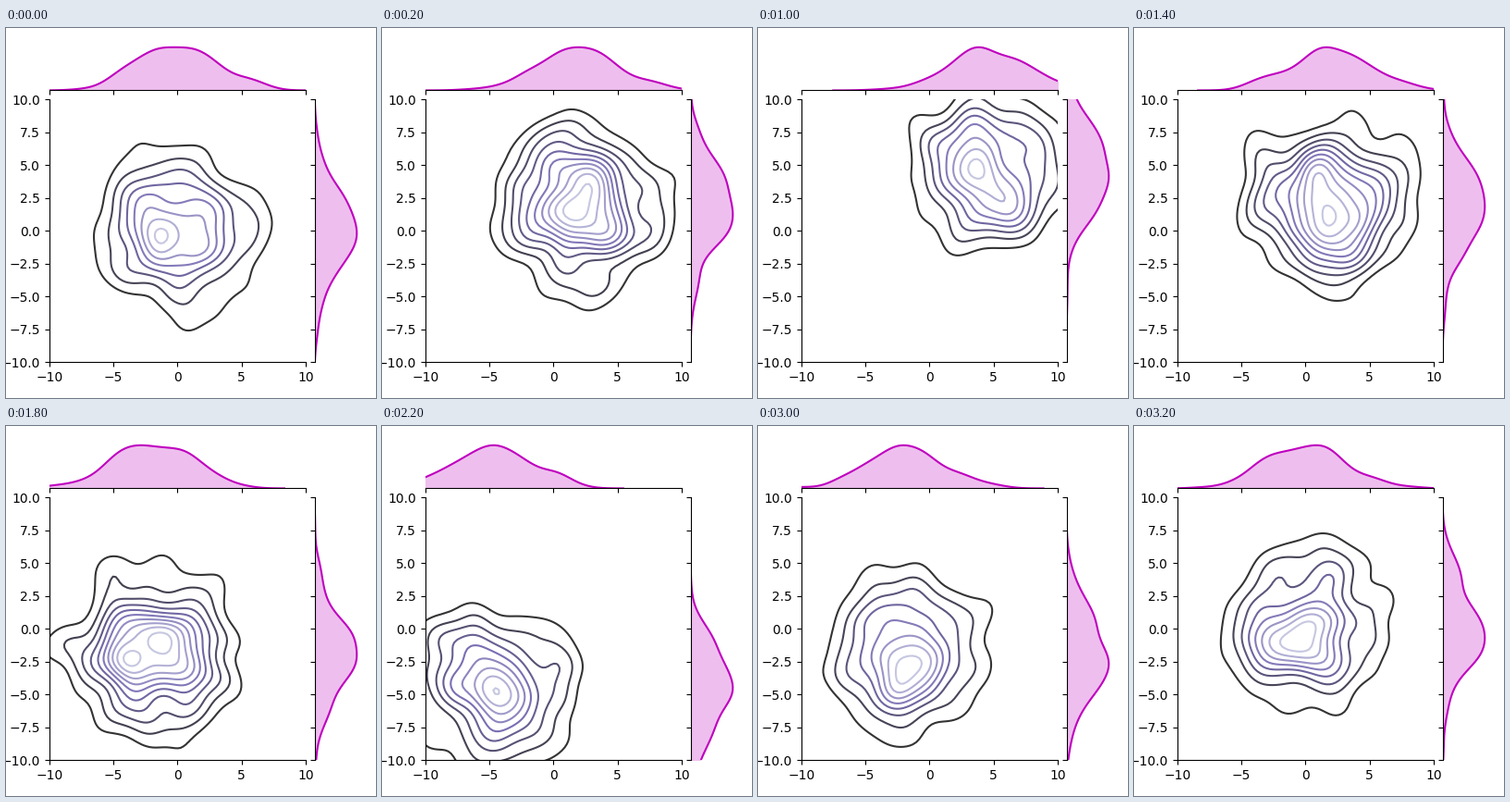
Animation of 400x400 px, one loop 3400 ms. Source, as a matplotlib script:

```python
import numpy as np
import matplotlib.pyplot as plt
from matplotlib.animation import FuncAnimation
from matplotlib.colors import LinearSegmentedColormap
from matplotlib.ticker import MaxNLocator

STEPS, INTERVAL = 17, 200
SWING, SPREAD, COUNT = 5, 3, 260
LINE = 1.5
MAGENTA = (0.75, 0, 0.75)
purples = plt.get_cmap("Purples_r")
CMAP = LinearSegmentedColormap.from_list("dusk", ["#333333", purples(1 / 3), purples(2 / 3)])

fig = plt.figure(figsize=(4, 4), dpi=100)
grid = fig.add_gridspec(6, 6, left=0.1168, right=0.9538, bottom=0.0968, top=0.9538,
                        wspace=0.2, hspace=0.2)
joint = fig.add_subplot(grid[1:, :-1])
top = fig.add_subplot(grid[0, :-1], sharex=joint)
side = fig.add_subplot(grid[1:, -1], sharey=joint)

joint.set_xticks(np.arange(-10, 11, 5))
joint.set_yticks(np.arange(-10, 11, 2.5))
joint.spines[["right", "top"]].set_visible(False)
top.spines[["left", "right", "top"]].set_visible(False)
side.spines[["bottom", "right", "top"]].set_visible(False)
top.set_yticks([])
side.set_xticks([])
top.tick_params(labelbottom=False)
side.tick_params(labelleft=False)


def sample(step):
    """Normal cloud whose centre swings along the diagonal, one sine per loop."""
    centre = SWING * np.sin(2 * np.pi * step / (STEPS - 1))
    values = np.random.RandomState(step).normal(size=(2, COUNT))
    values -= values.mean(axis=1, keepdims=True)
    values /= values.std(axis=1, keepdims=True)
    return centre + SPREAD * values


def kernels(values):
    """Evaluation axis and one Gaussian kernel per value, with Scott's bandwidth."""
    width = 1.059 * values.std() * len(values) ** -0.2
    axis = np.linspace(values.min() - 3 * width, values.max() + 3 * width, 100)
    return axis, np.exp(-0.5 * ((axis[:, None] - values) / width) ** 2)


def draw_marginals(x, x_height, y, y_height):
    x_height = x_height / x_height.max()
    y_height = y_height / y_height.max()
    top.plot(x, x_height, color=MAGENTA, lw=LINE)
    top.fill_between(x, x_height, color=MAGENTA, alpha=0.25, lw=0)
    side.plot(y_height, y, color=MAGENTA, lw=LINE)
    side.fill_betweenx(y, y_height, color=MAGENTA, alpha=0.25, lw=0)


def animate(step):
    for ax in (joint, top, side):
        for artist in [*ax.lines, *ax.collections]:
            artist.remove()

    (x, x_kernels), (y, y_kernels) = map(kernels, sample(step))
    density = y_kernels @ x_kernels.T
    # Round level steps are chosen on the normalised density.
    density /= density.sum() * (x[1] - x[0]) * (y[1] - y[0])
    levels = MaxNLocator(11, min_n_ticks=1).tick_values(0, density.max())
    levels = levels[(levels > 0) & (levels < density.max())]
    joint.contour(x, y, density, levels, cmap=CMAP, linewidths=LINE)
    draw_marginals(x, x_kernels.sum(axis=1), y, y_kernels.sum(axis=1))

    joint.set(xlim=(-10, 10), ylim=(-10, 10))
    top.set_ylim(0, 1.05)
    side.set_xlim(0, 1.05)


ani = FuncAnimation(fig, animate, frames=STEPS, interval=INTERVAL, repeat=True,
                    repeat_delay=0, init_func=lambda: None)
plt.show()
```
